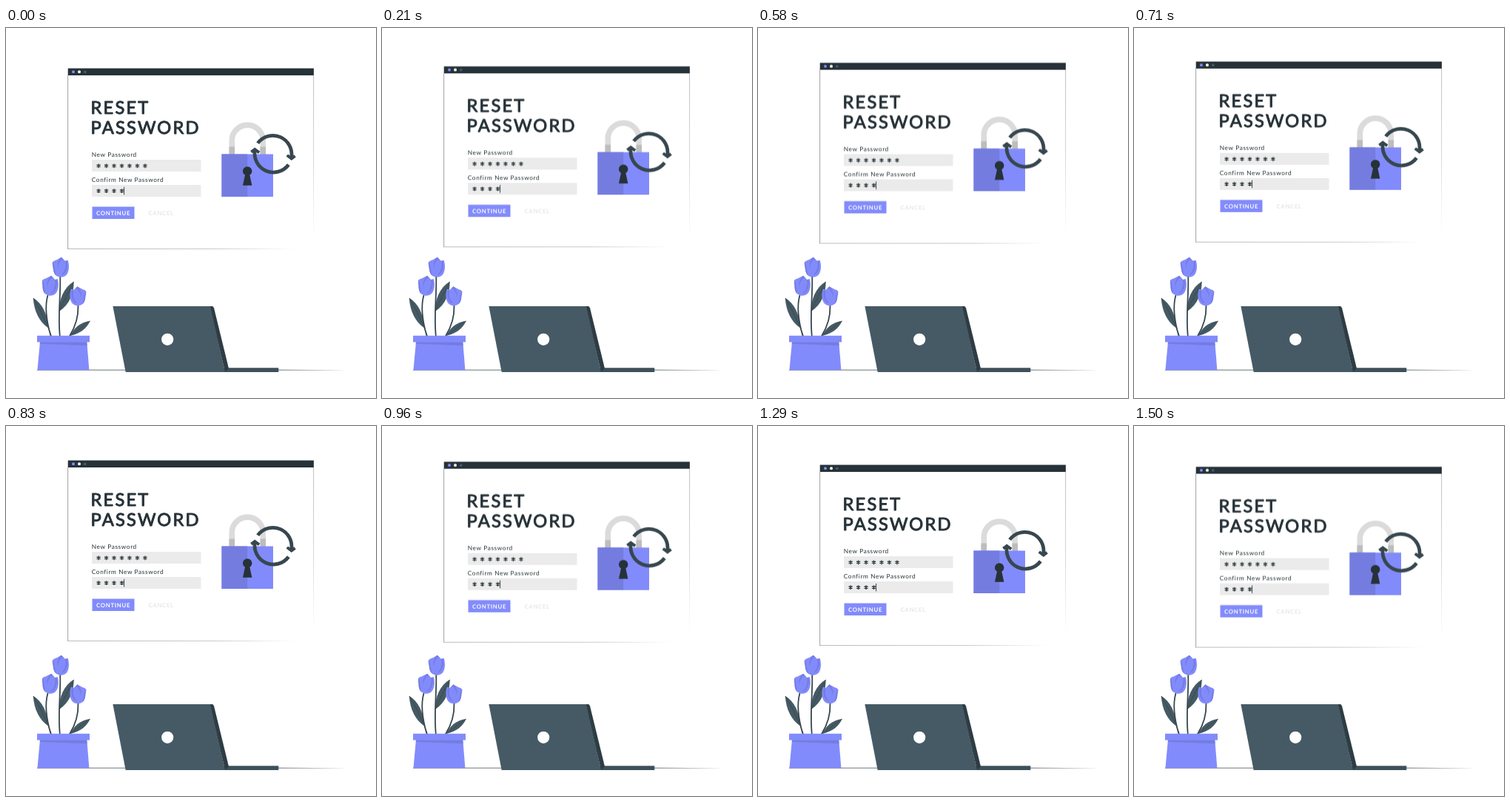
An HTML page for the animation above (1540 ms loop, 500 px wide and 500 px high).

```html
<!DOCTYPE html>
<html lang="en">
<head>
<meta charset="utf-8">
<title>Reset password</title>
<style>
  html, body { margin: 0; width: 100%; height: 100%; overflow: hidden; background: #fff; }
  svg { display: block; width: 100vw; height: 100vh; }
  text { font-family: Lato, "Open Sans", sans-serif; fill: #263238; text-rendering: geometricPrecision; }
  .title { font-size: 23.7px; letter-spacing: 2.15px; stroke: #263238; stroke-width: .95; stroke-linejoin: round; }
  .label { font-size: 8.3px; letter-spacing: .6px; }
  .btn { font-size: 7.8px; font-weight: 700; letter-spacing: .68px; }
  .main { fill: #828bfb; }
  .shade { fill: #747ce0; }
  .ink { fill: #263238; }
  .slate { fill: #455a64; }
  .line { fill: none; stroke: #37474f; }
  .window { animation: float 1540ms linear -46ms infinite; }
  @keyframes float {
    0%, 100% { transform: translateY(.5px); }
    50% { transform: translateY(-9.5px); }
  }
</style>
</head>
<body>
<svg viewBox="0 0 500 500">
  <defs>
    <linearGradient id="fadeX" gradientUnits="userSpaceOnUse" x1="84" y1="0" x2="416" y2="0">
      <stop offset="0" stop-color="#8c8c8c"/>
      <stop offset=".6" stop-color="#a6a6a6"/>
      <stop offset=".93" stop-color="#fff"/>
    </linearGradient>
    <linearGradient id="fadeY" gradientUnits="userSpaceOnUse" x1="0" y1="64" x2="0" y2="298">
      <stop offset="0" stop-color="#a0a0a0"/>
      <stop offset=".5" stop-color="#c4c4c4"/>
      <stop offset=".95" stop-color="#fff"/>
    </linearGradient>
    <path id="star" d="M0-2.9V2.9M-2.5-1.45L2.5 1.45M-2.5 1.45L2.5-1.45" stroke="#263238" stroke-width="1.3"/>
    <g id="tulip">
      <path class="main" d="M-9-9C-5-10-3-12 1-14C3-12 5-11 6-9C8-10 9-10 10-10C12-3 12 5 8 10C4 14-3 14-7 10C-9 8-10 3-10 0C-11-3-11-5-11-7Z"/>
      <path class="shade" d="M-11-7C-8-4-8 4-6 11C-9 8-10 3-10 0ZM1-14C-3-10-5-5-4 1C-3-5-1-9 3-12ZM6-9C8-3 7 5 1 10C7 9 10 2 9-8Z"/>
    </g>
    <g id="arrow">
      <path d="M-20.8-14.6A25.4 25.4 0 0 1 24.6 5" stroke-width="4.8"/>
      <path d="M18.8 1.8L24.8 6.2L29.6 2.6" stroke-width="4"/>
    </g>
  </defs>

  <g class="window">
    <path d="M83.6 64V298.8" stroke="#8c8c8c" stroke-width=".8"/>
    <path d="M415.6 64V298" stroke="url(#fadeY)" stroke-width=".7"/>
    <path d="M83.3 298.6H416" stroke="url(#fadeX)" stroke-width=".6"/>
    <path class="ink" d="M83.7 54.6H415.9V64.1H83.7Z"/>
    <circle class="main" cx="91" cy="59.4" r="2"/>
    <circle cx="99" cy="59.4" r="2" fill="#fff"/>
    <circle class="slate" cx="106.8" cy="59.4" r="1.9"/>

    <text class="title" x="114.6" y="116.3">RESET</text>
    <text class="title" x="114.6" y="142.8">PASSWORD</text>
    <text class="label" x="115.8" y="173.8">New Password</text>
    <text class="label" x="115.8" y="207.8">Confirm New Password</text>
    <path fill="#ebebeb" d="M116 178.2H263.5V194H116ZM116 212H263.5V228H116Z"/>
    <g id="stars"></g>
    <path d="M159.6 215V225.5" stroke="#263238" stroke-width=".9"/>
    <path class="main" d="M116.5 241.5H173.5V258H116.5Z"/>
    <text class="btn" x="122" y="253.4" style="fill:#fff">CONTINUE</text>
    <text class="btn" x="192.5" y="253.4" style="fill:#e6e6e6">CANCEL</text>

    <path d="M305.3 171V152.2A21 21 0 0 1 347.3 152.2V171" fill="none" stroke="#dbdbdb" stroke-width="7.6"/>
    <path fill="#bdbdbd" d="M301.5 160.5H309.1V171H301.5ZM343.5 160.5H351.1V171H343.5Z"/>
    <path class="main" d="M291.5 170.5H361V228H291.5Z"/>
    <path class="shade" d="M291.5 170.5H326.2V228H291.5Z"/>
    <circle class="ink" cx="326.2" cy="193.5" r="6.2"/>
    <path class="ink" d="M323.6 196H328.8L332.4 212.8H320Z"/>
    <g class="line" transform="translate(361 170.3)">
      <use href="#arrow"/>
      <use href="#arrow" transform="rotate(180)"/>
    </g>
  </g>

  <path fill="#37474f" d="M42 461.8H368L462 462.2L368 462.6H42Z"/>

  <g>
    <path class="slate" d="M36.7 364.7C49 372 56 386 56.7 405C45 397 38 383 36.7 364.7Z"/>
    <path class="slate" d="M91.6 342.6C92 358 86 374 71.8 383C71.5 367 78 351 91.6 342.6Z"/>
    <path class="slate" d="M113.7 395.7C109 406 101 412.5 87 415.7C92 405 100 398 113.7 395.7Z"/>
    <path class="line" stroke-width=".8" d="M37 365Q48 383 57 405T61 416M91.6 343Q81 362 72 383M113.7 396Q101 405 87 416"/>
    <path class="line" stroke-width="1.8" d="M56.5 361C52 377 54 394 60.5 416M73.2 336C74 362 70 388 72.8 416M97.5 375C98 392 93 405 86 416"/>
    <use href="#tulip" x="73.7" y="323.7"/>
    <use href="#tulip" transform="translate(59.5 348.7) rotate(3)"/>
    <use href="#tulip" transform="translate(97.5 362.7) scale(-.98 .96)"/>
    <path class="main" d="M46 424H109.3L112.4 462.2H42.4Z"/>
    <path class="shade" d="M46 424.3H109.2L109.6 429.3L45.8 426.8Z"/>
    <path class="main" d="M42 415.7H113V424.6H42Z"/>
  </g>

  <path fill="#3e5059" d="M234 459.3H368.3V465H234Z"/>
  <path fill="#2e3c43" d="M275 376.1H279.3L281 378.2L301 460L296 465Z"/>
  <path class="slate" d="M144.4 376.1H276L296 465H161.7Z"/>
  <circle cx="218.2" cy="420.8" r="8.1" fill="#fff"/>
</svg>
<script>
  const stars = document.getElementById("stars");
  const row = (count, y) => {
    for (let i = 0; i < count; i++) {
      const star = document.createElementNS("http://www.w3.org/2000/svg", "use");
      star.setAttribute("href", "#star");
      star.setAttribute("x", 125.1 + i * 10.47);
      star.setAttribute("y", y);
      stars.append(star);
    }
  };
  row(7, 186.4);
  row(4, 220.2);
</script>
</body>
</html>
```
